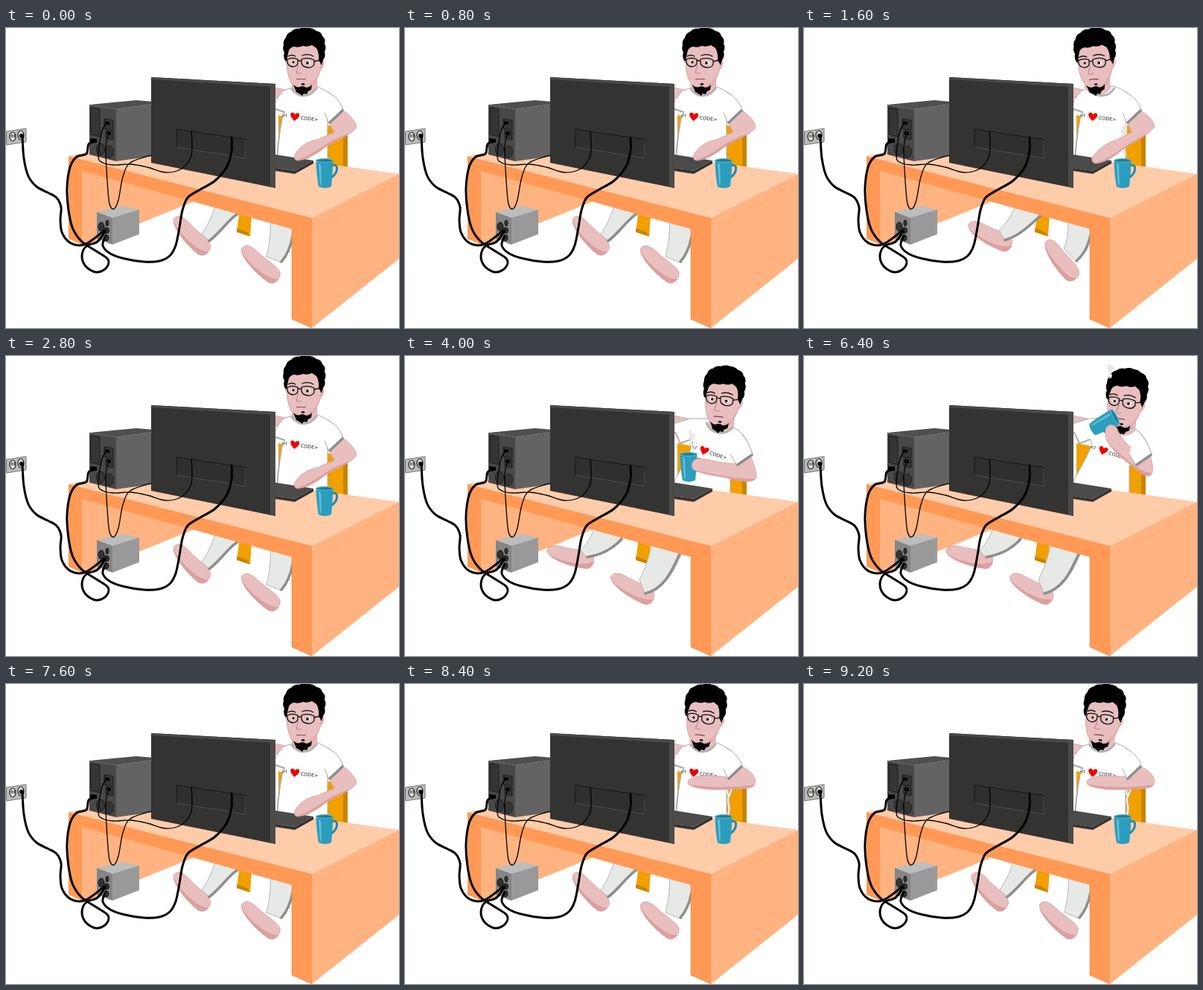
Animation of 528 by 403 pixels, one loop 9.6 s. Source, as an HTML page:

```html
<!DOCTYPE html>
<html lang="en">
<head>
<meta charset="utf-8">
<title>Coder at the desk</title>
<style>
  html, body { margin: 0; width: 100%; height: 100%; overflow: hidden; background: #fff; }
  svg { display: block; width: 528px; height: 403px; }
  text { font: 6.4px "DejaVu Sans", Verdana, sans-serif; fill: #222; }
  .skin { fill: #e9bebe; stroke: #d9a0a0; stroke-width: .8; stroke-linejoin: round; }
  .dark { fill: #dba0a0; }
  .shirt { fill: #fff; stroke: #aaa; stroke-width: 1; stroke-linejoin: round; }
  .fold, .collar, .line { fill: none; stroke: #8d8d8d; stroke-width: 3.5; stroke-linecap: round; }
  .collar { stroke: #b4b4b4; stroke-width: 3; }
  .line { stroke: #111; stroke-width: 1.3; }
  .pants { fill: #e7e9e7; stroke: #b5b8b5; stroke-width: 1; }
  .cable { fill: none; stroke: #000; stroke-linecap: round; stroke-linejoin: round; }
</style>
</head>
<body>
<svg viewBox="0 0 528 403">
  <g id="chair">
    <path fill="#f0a000" d="M366 117L459 136V187L366 178Z"/>
    <path fill="#c88400" d="M453 136L459 137V187L453 185Z"/>
    <path fill="#f0a000" d="M314 244L330 250L328 280L310 274Z"/>
    <path fill="#c88400" d="M310 269L324 274L328 280L310 274Z"/>
  </g>
  <path fill="#ffb380" d="M102 188L262 226V229L102 294Z"/>
  <g id="back"></g>
  <g id="desk">
    <path fill="#ffccaa" d="M84 172L112 166L200 150L362 173L528 196L411 255Z"/>
    <path fill="#ffb380" d="M411 255L528 196V310L411 403Z"/>
    <path fill="none" stroke="#f7a873" stroke-width=".7" d="M411 271L528 210"/>
    <path fill="#ff9955" d="M84 172L411 255V403L384 391V270L102 192V291L84 283Z"/>
    <path fill="none" stroke="#d98348" stroke-width=".6" d="M384 270V391L411 403"/>
    <path fill="#4b4b4b" d="M362 170L413 178L388 192L362 188Z"/>
    <path fill="#333" d="M362 188L388 192L413 178V182L388 196L362 192Z"/>
  </g>
  <g id="front"></g>
  <g id="gear">
    <path fill="#484848" d="M112 103L148 109V179L112 170Z"/>
    <path fill="#636363" d="M148 109L198 102V172L148 179Z"/>
    <path fill="#4f4f4f" d="M112 103L175 97L198 99V102L148 109Z"/>
    <g fill="#353535" stroke="#1c1c1c">
      <path d="M114 107L126 109V146L114 143Z"/>
      <path d="M132 122L144 124V137L132 135ZM134 137L144 139V150L134 148Z"/>
      <ellipse cx="127" cy="163" rx="5.5" ry="8"/>
      <ellipse cx="139" cy="166" rx="5.5" ry="8"/>
    </g>
    <path fill="#333331" d="M195 66L362 75V215L195 181Z"/>
    <path fill="#4a4a48" d="M195 66L362 75V215L355 213V79L195 69Z"/>
    <path fill="#2f2f2d" stroke="#151515" d="M229 136L323 150L322 175L229 160Z"/>
    <path fill="none" stroke="#585856" d="M229 160L322 175V151"/>
    <path fill="#858585" d="M122 247L143 255V291L122 283Z"/>
    <path fill="#bdbdbd" d="M122 247L158 239L179 244L143 255Z"/>
    <path fill="#999" d="M143 255L179 244V277L143 291Z"/>
    <g fill="#333" stroke="#111">
      <ellipse cx="128" cy="267" rx="4" ry="6"/>
      <ellipse cx="136" cy="262" rx="2" ry="4"/>
      <ellipse cx="135" cy="272" rx="3.5" ry="4"/>
      <ellipse cx="135" cy="282" rx="3" ry="4"/>
    </g>
    <path fill="#bcbcb8" stroke="#777" d="M.5 139L27 135V153L.5 157Z"/>
    <g fill="#ddd" stroke="#222" stroke-width="1.2">
      <ellipse cx="9" cy="146" rx="4" ry="6"/>
      <ellipse cx="20" cy="144" rx="4" ry="6"/>
      <path d="M8 143V147M11 143V147"/>
    </g>
    <circle cx="21" cy="145" r="3"/>
    <path d="M113 148L122 149V154L113 155ZM133 125L139 126V130L133 129ZM135 139L141 140V144L135 143Z"/>
  </g>
  <g id="cables"></g>
</svg>
<script>
const el = id => document.getElementById(id);
const path = (cls, d) => `<path class="${cls}" d="${d}"/>`;
const group = (transform, body) => `<g transform="${transform}">${body}</g>`;

// Smooth curve through a flat list of coordinates
function curve(p) {
  const n = p.length / 2;
  const at = i => {
    const k = Math.max(0, Math.min(n - 1, i)) * 2;
    return [p[k], p[k + 1]];
  };
  let d = `M${at(0)}`;
  for (let i = 0; i < n - 1; i++) {
    const [a, b, c, e] = [at(i - 1), at(i), at(i + 1), at(i + 2)];
    const c1 = b.map((v, k) => v + (c[k] - a[k]) / 6);
    const c2 = c.map((v, k) => v - (e[k] - b[k]) / 6);
    d += `C${c1} ${c2} ${c}`;
  }
  return d;
}

const cables = [
  [3, [22, 146, 24, 175, 30, 199, 41, 213, 56, 221, 68, 228, 74, 241, 73, 257, 75, 274, 84, 287, 98, 292, 111, 288, 131, 273]],
  [3, [119, 152, 111, 156, 108, 169, 95, 173, 86, 187, 82, 215, 84, 245, 90, 270, 102, 287, 120, 299, 137, 311, 134, 323, 121, 328, 107, 320, 102, 306, 108, 293, 123, 287, 134, 272]],
  [3, [134, 279, 130, 292, 140, 303, 160, 310, 185, 314, 206, 313, 220, 306, 228, 292, 233, 268, 237, 245, 244, 228, 259, 218, 281, 205, 297, 186, 303, 165, 303, 147]],
  [1.3, [138, 142, 134, 160, 136, 205, 139, 236, 145, 243, 151, 231, 157, 200, 167, 181, 195, 171]],
  [1.3, [136, 128, 129, 138, 124, 172, 130, 181, 145, 184, 168, 183, 190, 187, 215, 194, 236, 189, 248, 174, 250, 157, 249, 139]]
];
el("cables").innerHTML = cables.map(([w, p]) =>
  `<path class="cable" stroke-width="${w}" d="${curve(p)}"/>`).join("");

const foot = ([x, y, turn]) => group(`translate(${x} ${y}) rotate(${turn})`,
  path("skin", "M0 1C-2-9 10-11 22-10C38-10 54-14 61-8C66-1 65 8 57 11C42 13 12 12 0 1Z") +
  path("dark", "M1 3C16 9 38 8 50 6C57 4 61 2 64-1C65 5 62 10 57 11C42 13 12 12 1 3Z"));

const leg = ({ at, pants, fold }) => foot(at) + path("pants", pants) + path("fold", fold);

const legs = {
  sit: [
    { at: [226, 256, 45], pants: "M263 277C270 266 276 255 281 240L315 246C300 258 290 272 273 286Z", fold: "M312 249C298 258 288 275 273 286" },
    { at: [317, 296, 41], pants: "M355 258L386 266C386 284 380 302 370 315L350 307C354 290 356 276 355 258Z", fold: "M385 280C382 296 377 306 370 314" }
  ],
  shift: [
    { at: [221, 265, 26], pants: "M262 272C272 262 279 252 283 240L320 248C306 260 296 276 270 285Z", fold: "M318 252C304 264 292 278 270 285" },
    { at: [325, 287, 51], pants: "M355 258L386 266C386 284 378 301 365 313L349 296C355 284 355 272 355 258Z", fold: "M385 278C381 296 375 305 366 313" }
  ],
  reach: [
    { at: [191, 262, 13], pants: "M236 261C244 253 250 243 254 232L294 242C282 255 268 266 244 270Z", fold: "M291 246C280 258 266 267 245 270" },
    { at: [283, 297, 33], pants: "M318 299C326 283 330 268 332 252L375 262C362 288 350 312 328 321Z", fold: "M369 266C360 288 350 309 329 320" }
  ]
};
legs.lean = [legs.reach[0],
  { at: [277, 297, 28], pants: "M315 300C324 284 328 268 332 252L373 262C362 288 350 314 322 319Z", fold: "M369 266C358 290 348 313 323 319" }];

const slogan = (x, y, turn) => group(`translate(${x} ${y}) rotate(${turn})`,
  `<text x="-18" y="2">&lt;I</text><text x="8" y="3">CODE&gt;</text>
   <path fill="#f00000" d="M0 6C-4 2-6 0-6-2.5C-6-6-1-6 0-2.5C1-6 6-6 6-2.5C6 0 4 2 0 6Z"/>`);

const torsos = {
  up: {
    body: "M385 80L373 84C366 91 362 99 357 108L375 114L371 122C367 142 366 160 364 180L432 184V122L436 128L453 110C448 98 440 87 416 78Z",
    shade: "M358 107L375 113M370 124C366 146 365 160 364 175",
    collar: "M384 82C393 94 408 94 417 81",
    sleeve: "M432 86C445 93 450 101 453 110L434 128L428 114",
    hem: "M435 127L452 111",
    text: [388, 119, 6]
  },
  lean: {
    body: "M407 84L384 84L360 91V98L370 118L385 112L387 119C378 140 370 152 361 170V180L437 188V147L446 147L467 132C460 112 452 98 436 95Z",
    shade: "M363 102L370 117L384 112",
    collar: "M405 90C411 106 431 107 440 96",
    sleeve: "M446 98C458 109 463 120 467 132L446 147L437 132",
    hem: "M447 146L466 133",
    text: [402, 127, 17]
  }
};

const neck = ([x, y, turn]) => group(`translate(${x} ${y}) rotate(${turn} 400 88)`,
  path("skin", "M387 68L417 56L418 82C408 94 392 92 384 79Z"));

const head = ([x, y, turn]) => group(`translate(${x} ${y}) rotate(${turn} 400 88)`,
  path("skin", "M421 43C427 40 429 47 425 53C423 57 420 57 419 54Z") +
  path("skin", "M377 28C376 50 378 65 383 73C389 84 396 88 402 87C412 82 420 68 424 50L425 24C410 12 385 14 377 28Z") +
  `<path fill="#dfadad" opacity=".7" d="M424 46C420 64 412 75 402 78L403 87C413 82 420 68 424 50Z"/>` +
  path("", "M375 44Q372 38 374 33Q371 28 373 23Q372 17 376 13Q377 7 383 5Q388 0 394 1Q400-2 406 0Q413 0 417 4Q424 5 425 11Q430 15 428 21Q431 26 428 32Q430 38 426 43L424 50L420 43Q421 34 417 27L411 23Q405 26 399 24Q392 27 388 25Q383 25 380 30Q378 37 377 45Z") +
  path("", "M386 76Q391 81 395 79Q399 77 403 80Q408 80 411 76L410 83L406 85L404 89L400 88L398 91L394 88L390 86Z") +
  `<ellipse cx="399" cy="75.5" rx="2.5" ry="1.2"/>
   <ellipse cx="385.5" cy="46" rx="2.6" ry="2.2" fill="#fff"/><ellipse cx="406" cy="47" rx="3.4" ry="2.4" fill="#fff"/>
   <circle cx="386" cy="46" r="1.7"/><circle cx="405" cy="47" r="1.9"/>` +
  path("line", "M378 42Q385 39 392 42V48Q390 52 385 52Q379 51 378 46ZM397 42Q406 39 414 43V49Q411 54 405 53Q398 52 397 47ZM392 44L397 44M414 45L423 43M379 38Q384 35 389 38M398 37Q406 34 413 38") +
  `<path fill="none" stroke="#c08080" d="M393 50L390 60Q393 63 397 60"/><path fill="none" stroke="#7d3f3f" stroke-width="1.2" d="M390 69Q396 68 403 69"/>`);

// Two strokes make a pale ribbon with a grey rim
const steam = ([x, y, flip, tall]) => group(`translate(${x} ${y}) scale(${flip} ${tall})`,
  ["#c8c8c8", "#fff"].map((c, i) =>
    `<path fill="none" stroke="${c}" stroke-width="${3 - i * 1.6}" stroke-linecap="round" d="M4-4C9-15 1-18 5-28C7-34 10-36 7-41M5-28C1-34 5-42 3-49"/>`).join(""));

const mug = ([x, y, turn]) => group(`translate(${x} ${y}) rotate(${turn})`,
  `<path fill="none" stroke="#2688a6" stroke-width="3" d="M10 7C19 3 19 16 9 23"/>
   <path fill="#2b9dbd" d="M-11.5 0C-11 14-10 26-8 35Q0 39 9 35C10 26 11 14 11.5 0Z"/>
   <path fill="#62bfd6" d="M-8 4L-5 5L-4 33L-6 32Z"/>
   <ellipse rx="11.500" ry="2.4" fill="#1e7d99" stroke="#63bdd3"/>`);

const arms = {
  type: ["M450 109C460 115 470 124 471 133C468 141 445 150 430 159C418 169 402 178 391 178C386 176 386 171 390 167C397 157 407 152 418 150L441 140L434 126Z", "M469 137C448 147 432 153 420 163C408 170 400 175 391 177C403 179 418 169 430 159Z"],
  press: ["M450 109C460 115 470 124 471 132C466 142 445 152 431 161C418 172 402 182 391 182C386 180 385 174 390 170C398 161 407 154 418 151L440 140L434 126Z", "M469 137C448 149 433 157 420 167C408 175 400 179 391 181C403 183 418 172 431 161Z"],
  cross: ["M450 110C461 114 471 122 471 132C469 140 455 141 440 141C420 143 390 142 381 135C377 129 385 126 394 124C407 122 426 125 440 125L435 123Z", "M470 135C450 138 415 141 383 135C394 143 424 142 440 141C455 141 468 141 470 135Z"],
  hold: ["M463 132C468 143 473 155 472 163C468 172 448 168 430 163C415 161 398 158 388 153C383 148 385 141 392 138C403 137 420 143 433 144L447 145Z", "M471 165C452 166 420 160 389 153C405 160 420 161 430 163C448 168 466 171 471 165Z"],
  sip: ["M464 130C468 142 470 153 467 159C462 166 451 156 440 147C429 139 416 128 410 119C404 111 403 99 408 94C414 90 421 95 422 101L431 115L449 132Z", "M467 158C450 154 430 138 410 117C416 128 429 139 440 147C451 156 462 166 467 158Z"],
  grab: ["M464 131C472 143 480 156 479 165C474 177 455 188 442 198C435 202 427 200 424 195C424 190 432 187 436 184C445 178 453 170 456 163L446 146Z", "M479 166C466 177 450 186 438 198C448 196 474 177 479 166Z"]
};

const onDesk = [428, 178, 0], raised = [381, 132, 0], tipped = [418, 82, 62];
const poses = {
  idle:  { torso: "up", legs: "sit", arm: "type", head: [0, 0, 0], mug: onDesk },
  rest:  { torso: "up", legs: "sit", arm: "press", head: [-3, 0, -1], mug: onDesk, steam: [428, 177, 1, 1] },
  cross: { torso: "up", legs: "sit", arm: "cross", head: [-2, 0, 5], mug: onDesk, steam: [430, 179, 1, 1] },
  tilt:  { torso: "up", legs: "shift", arm: "press", head: [-6, 0, -4], mug: onDesk, steam: [436, 175, -1, 1] },
  grab:  { torso: "lean", legs: "reach", arm: "grab", head: [23, 14, 4], mug: onDesk, steam: [428, 177, 1, 1] },
  hold:  { torso: "lean", legs: "lean", arm: "hold", head: [23, 13, 5], mug: raised, steam: [380, 130, 1, .6] },
  sip:   { torso: "lean", legs: "lean", arm: "sip", head: [26, 16, 7], mug: tipped, steam: [407, 31, 1, .4] }
};

const steps = [
  [0, "idle"], [400, "cross"], [800, "idle"], [1200, "cross"], [1600, "tilt"],
  [2000, "rest"], [2800, "idle"], [3200, "grab"], [3600, "sip"], [4000, "hold"],
  [5200, "sip"], [5600, "hold"], [6400, "sip"], [6800, "hold"], [7200, "grab"],
  [7600, "idle"], [8000, "rest"], [8400, "cross"], [8800, "idle"], [9200, "cross"]
];
const LOOP = 9600;

function draw(name) {
  const p = poses[name], t = torsos[p.torso];
  const arm = path("skin", arms[p.arm][0]) + path("dark", arms[p.arm][1]);
  const cup = mug(p.mug);
  el("back").innerHTML = legs[p.legs].map(leg).join("") +
    path("skin", "M361 80L385 85L361 95Z") +
    path("shirt", t.body) +
    `<path fill="none" stroke="#aaa" stroke-width="1.5" d="${t.shade}"/>` +
    slogan(...t.text) + neck(p.head) + path("collar", t.collar) + head(p.head);
  el("front").innerHTML = (p.steam ? steam(p.steam) : "") +
    (p.mug === onDesk ? arm + cup : cup + arm) +
    path("shirt", t.sleeve) + path("fold", t.hem);
}

let shown = "";
function tick(now) {
  const time = now % LOOP;
  const name = steps.filter(s => s[0] <= time).pop()[1];
  if (name !== shown) draw(shown = name);
  requestAnimationFrame(tick);
}
draw(shown = "idle");
requestAnimationFrame(tick);
</script>
</body>
</html>
```
